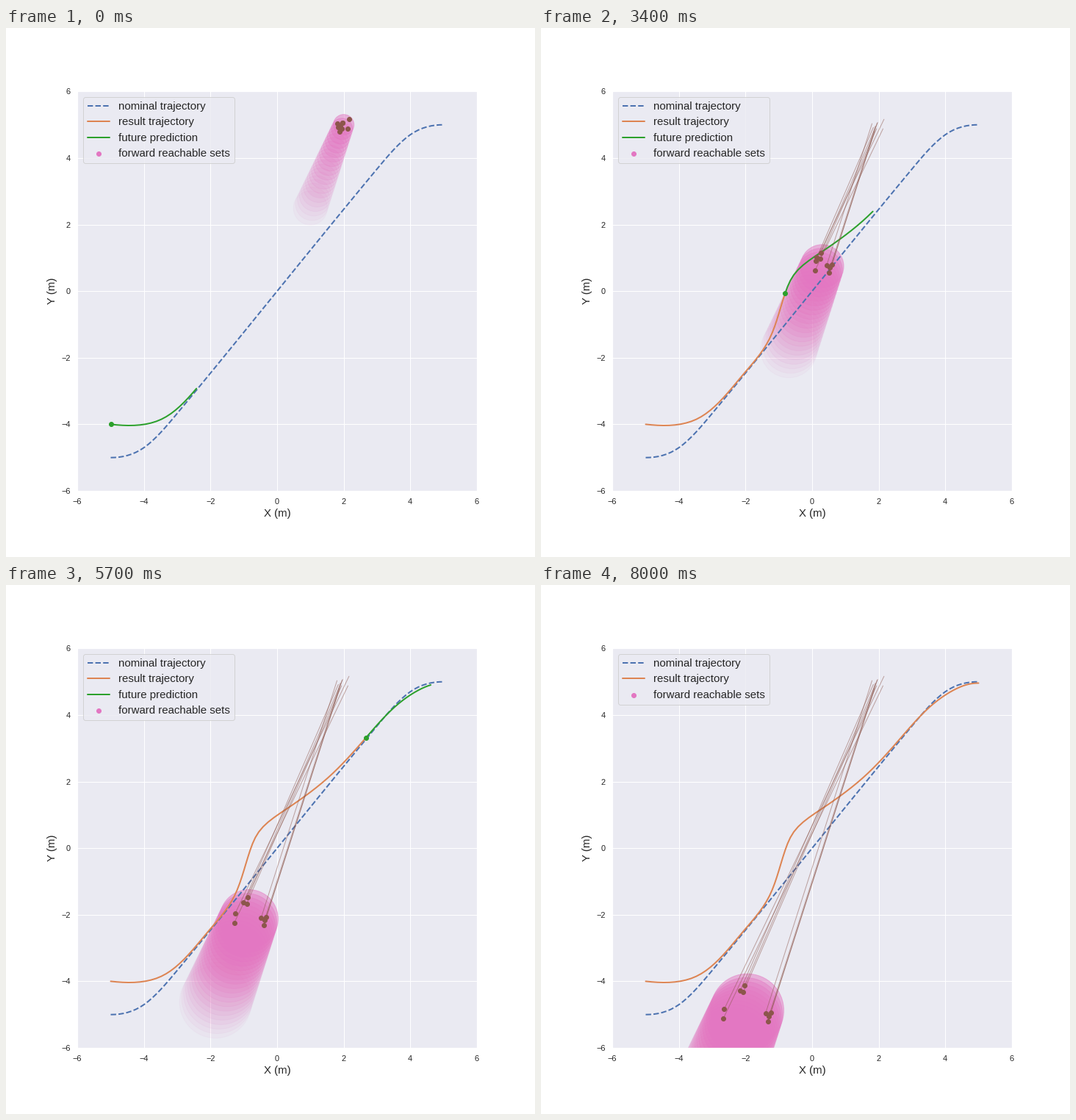
These frames come from a looping animation (720x720 px, 8100 ms). A matplotlib script:

```python
import numpy as np
import matplotlib.pyplot as plt
from matplotlib.animation import FuncAnimation
from matplotlib.patches import Circle

plt.rcParams.update({
    "font.family": "Liberation Sans",
    "text.color": ".15",
    "axes.labelcolor": ".15",
    "lines.solid_capstyle": "round",
    "patch.linewidth": 1,
})

SIZE, DPI = 720, 72
STEPS = 80        # simulation steps
HORIZON = 17      # length of the planned path, in steps
REACH = 20        # number of predicted obstacle sets
ALERT = 20        # step at which the obstacle starts to bend the plan
BLUE, ORANGE, GREEN = "#4c72b0", "#dd8452", "#2ca02c"
PINK, BROWN, PANEL = "#e377c2", "#8c564b", "#eaeaf2"


def spline(t, points, at, start_slope, end_slope):
    """Cubic spline through points at times t, with given end slopes."""
    h = np.diff(t)
    chord = np.diff(points, axis=0) / h[:, None]
    system = np.eye(len(t))
    rhs = np.zeros_like(points)
    rhs[0], rhs[-1] = start_slope, end_slope
    for i in range(1, len(t) - 1):
        a, b = h[i - 1], h[i]
        system[i, i - 1:i + 2] = b, 2 * (a + b), a
        rhs[i] = 3 * (b * chord[i - 1] + a * chord[i])
    slopes = np.linalg.solve(system, rhs)

    k = np.clip(np.searchsorted(t, at, side="right") - 1, 0, len(h) - 1)
    step = h[k][:, None]
    u = (at - t[k])[:, None] / step
    return ((1 + 2 * u) * (1 - u) ** 2 * points[k]
            + u * (1 - u) ** 2 * step * slopes[k]
            + u ** 2 * (3 - 2 * u) * points[k + 1]
            + u ** 2 * (u - 1) * step * slopes[k + 1])


def nominal_y(x):
    """Nearly straight middle that levels out at both ends."""
    half = np.array([3, 4, 5.])
    heights = np.array([3.67, 4.7, 5])
    keys = np.r_[-half[::-1], half]
    values = np.r_[-heights[::-1], heights][:, None]
    return spline(keys, values, x, 0, 0)[:, 0]


# Way points of the robot: step, x, y
way = np.array([
    (0, -5, -4), (9, -3.48, -3.85), (20, -2.06, -2.49), (27, -1.28, -1.43),
    (34, -.81, -.06), (37, -.55, .49), (42, .27, 1.17), (49, 1.51, 2.1),
    (64, 3.53, 4.24), (72, 4.44, 4.84), (80, 5, 4.96),
])
driven = spline(way[:, 0], way[:, 1:], np.arange(STEPS + 1.0),
                (.18, -.02), (.05, 0))

# Plan without the obstacle: slow down along the nominal line
n = np.arange(1, HORIZON + 10)
ahead_x = driven[ALERT, 0] + .13 * n - .002 * n ** 2
unaware = np.vstack([driven[:ALERT + 1],
                     np.column_stack([ahead_x, nominal_y(ahead_x)])])

# Sampled obstacles: velocity -> offsets from the centre of the first set
OBSTACLE, DRIFT = np.array([2, 5]), np.array([-.05, -.125])
groups = {
    (-.05, -.115): [(-.03, .07), (-.16, -.08), (-.065, -.12)],
    (-.06, -.125): [(.16, .165), (.13, -.12)],
    (-.04, -.125): [(-.2, .035), (-.045, .05), (-.1, -.04), (-.125, -.195)],
}
starts = OBSTACLE + np.concatenate(list(groups.values()))
velocities = np.repeat(list(groups), [len(g) for g in groups.values()], axis=0)

fig = plt.figure(figsize=(SIZE / DPI, SIZE / DPI), dpi=DPI, facecolor="white")
ax = fig.add_axes([.135, .125, .755, .755], facecolor=PANEL)
ax.set(xlim=(-6, 6), ylim=(-6, 6),
       xticks=range(-6, 7, 2), yticks=range(-6, 7, 2))
ax.set_xlabel("X (m)", fontsize=15, labelpad=5)
ax.set_ylabel("Y (m)", fontsize=15, labelpad=5)
ax.tick_params(length=0, pad=9.5, labelsize=11, labelcolor=".15")
ax.set_axisbelow(True)
ax.grid(color="white", linewidth=1)
for spine in ax.spines.values():
    spine.set(edgecolor="white", linewidth=1.25)

sets = [ax.add_patch(Circle((0, 0), 1, color=PINK, alpha=.5 * .89 ** j))
        for j in range(REACH + 1)]
x = np.linspace(-5, 5, STEPS + 1)
nominal, = ax.plot(x, nominal_y(x), "--", color=BLUE, lw=2,
                   label="nominal trajectory")
result, = ax.plot([], [], color=ORANGE, lw=2, label="result trajectory")
future, = ax.plot([], [], color=GREEN, lw=2, label="future prediction")
set_key = ax.scatter([], [], s=36, color=PINK, linewidths=1,
                     label="forward reachable sets")
trails = [ax.plot([], [], color=BROWN, lw=1, alpha=.5)[0] for _ in starts]
samples, = ax.plot([], [], "o", color=BROWN, ms=6)
robot, = ax.plot([], [], "o", color=GREEN, ms=6)


def make_legend(handles):
    legend = ax.legend(handles=handles, loc="upper left", fontsize=15,
                       scatterpoints=1, framealpha=.8, facecolor=PANEL,
                       edgecolor=".8")
    legend.set_zorder(5)
    return legend


running_legend = make_legend([nominal, result, future, set_key])
ax.add_artist(running_legend)
final_legend = make_legend([nominal, result, set_key])


def planned(i):
    """Path ahead; the plan turns from straight on to the detour."""
    end = min(i + HORIZON, STEPS)
    ahead = driven[i:end + 1]
    weight = np.clip((i - ALERT) / 5, 0, 1)
    if weight < 1:
        ahead = weight * ahead + (1 - weight) * unaware[i:end + 1]
    return ahead


def update(i):
    running = i < STEPS
    result.set_data(*driven[:i + 1].T)
    robot.set_data(*driven[i:i + 1].T)
    if running:
        future.set_data(*planned(i).T)
    for artist in (future, robot, running_legend):
        artist.set_visible(running)
    final_legend.set_visible(not running)

    now = starts + i * velocities
    samples.set_data(*now.T)
    for trail, a, b in zip(trails, starts, now):
        trail.set_data([a[0], b[0]], [a[1], b[1]])

    # The sets stay where they are once the goal is reached
    for k, circle in enumerate(sets, min(i, STEPS - 1)):
        circle.set_center(OBSTACLE + k * DRIFT)
        circle.set_radius(.31 + .01 * k)
    return []


anim = FuncAnimation(fig, update, frames=STEPS + 1, interval=100, repeat=True,
                     repeat_delay=0, init_func=lambda: update(0), blit=False)
plt.show()
```
